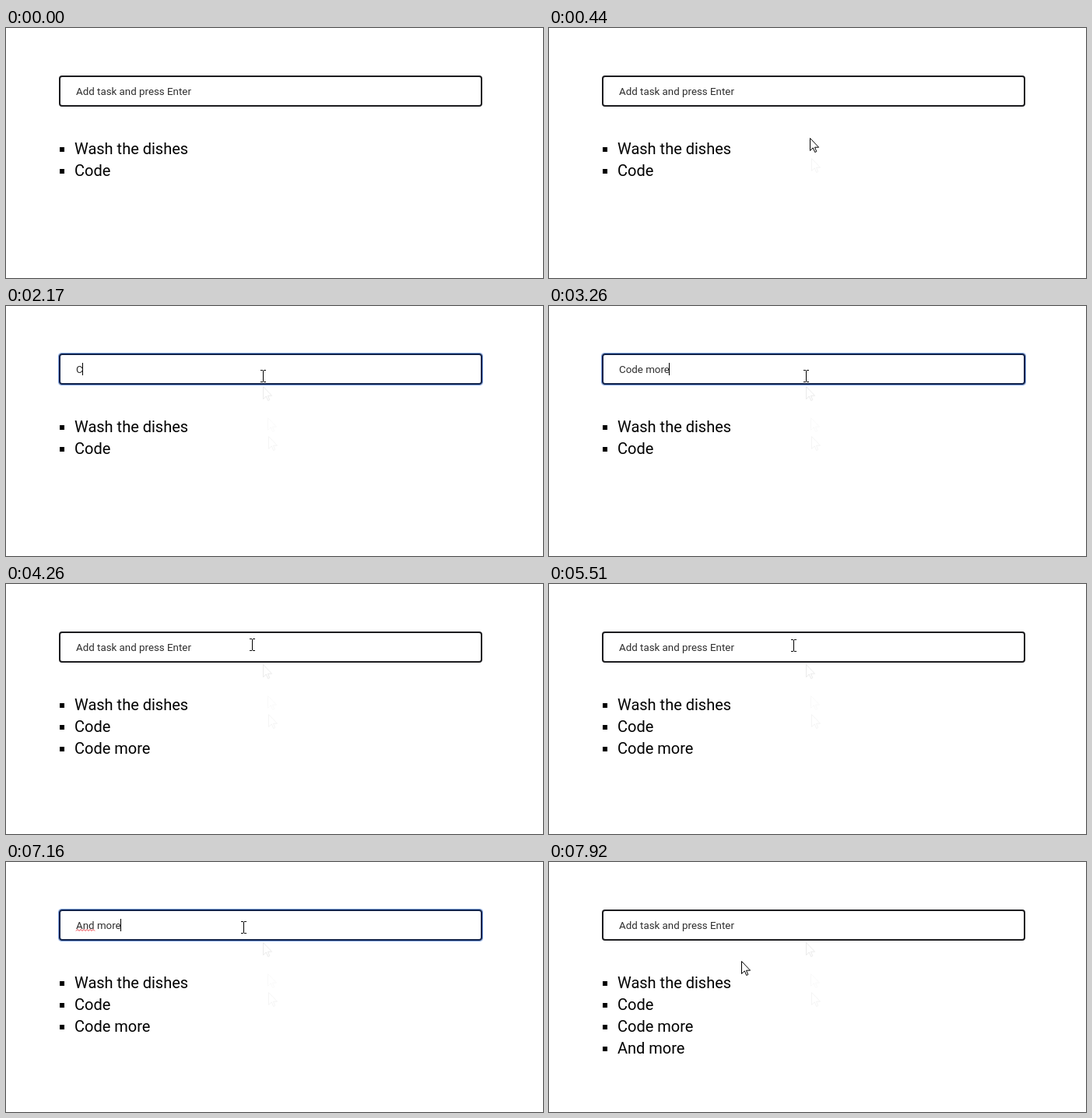
These frames come from a looping animation (690 by 321 pixels, 8 s). An HTML page:

```html
<!DOCTYPE html>
<html lang="en">
<head>
<meta charset="utf-8">
<title>Task list</title>
<style>
  html, body { margin: 0; width: 100%; height: 100%; overflow: hidden; background: #fff; }
  svg { display: block; width: 690px; height: 321px; }
  text { font-family: Roboto, Arial, sans-serif; white-space: pre; }
  .small { font-size: 13.333px; fill: #2e2e2e; }
  .item { font-size: 20px; fill: #000; }
  .off { visibility: hidden; }
  #box { fill: none; stroke: #1c1c1f; stroke-width: 2; }
  #box.focus { stroke: #10224a; }
  #ring { fill: none; stroke: #7fa3e2; }
  #squiggle { fill: none; stroke: #e8313a; }
</style>
</head>
<body>
<svg viewBox="0 0 690 321">
  <defs>
    <path id="arrow" d="M.5 .5V16.5L4.3 12.9 6.7 18.5 8.8 17.6 6.5 12.2H11.6Z" fill="#fff" stroke="#000"/>
    <path id="beam" d="M-3 -7.5H0M1 -7.5H4M.5 -7V7M-3 7.5H0M1 7.5H4" fill="none" stroke="#000"/>
  </defs>

  <rect id="ring" x="67.5" y="60.5" width="545" height="41" rx="3.5"/>
  <rect id="box" x="69" y="62" width="542" height="38" rx="3"/>
  <text id="hint" class="small" x="90" y="86">Add task and press Enter</text>
  <text id="value" class="small" x="90" y="86"></text>
  <path id="squiggle" d="M90 88.5l2 -2 2 2 2 -2 2 2 2 -2 2 2 2 -2 2 2 2 -2 2 2 2 -2 2 2"/>
  <rect id="caret" y="73" width="1" height="16"/>

  <g id="list"></g>
  <g id="trail"></g>
  <use id="cursor"/>
</svg>
<script>
const LOOP = 8000;
const $ = id => document.getElementById(id);
const SVG = 'http://www.w3.org/2000/svg';

function add(parent, tag, attrs, text = '') {
  const el = document.createElementNS(SVG, tag);
  for (const key in attrs) el.setAttribute(key, attrs[key]);
  el.textContent = text;
  parent.append(el);
  return el;
}

const show = (el, on) => el.classList.toggle('off', !on);
const latest = (steps, t) => steps.filter(s => s[0] <= t).pop();

// [time, shape, x, y]
const moves = [
  [140, 'arrow', 344, 198], [215, 'arrow', 341, 183], [290, 'arrow', 337, 167],
  [370, 'arrow', 336, 155], [440, 'arrow', 335, 141], [520, 'arrow', 332, 121],
  [600, 'arrow', 330, 103], [670, 'beam', 331, 94], [750, 'beam', 332, 90],
  [1010, 'beam', 330, 90], [4110, 'beam', 326, 86], [4180, 'beam', 320, 81],
  [4260, 'beam', 316, 78], [4890, 'beam', 316, 77], [5450, 'beam', 314, 79],
  [5520, 'beam', 312, 81], [5810, 'beam', 308, 83], [5920, 'beam', 305, 84],
  [7860, 'arrow', 270, 108], [7920, 'arrow', 247, 127]
];

const sessions = [
  { focus: 820, submit: 3560, text: 'Code more',
    keys: [2170, 2310, 2400, 2550, 2640, 2870, 3030, 3140, 3260],
    blinks: [1380, 1850] },
  { focus: 5600, submit: 7540, text: 'And more', checked: 6610,
    keys: [6310, 6460, 6530, 6610, 6760, 6910, 6990, 7160],
    blinks: [6130, 6310] }
];

// Faint marks left along the pointer's path: [time, x, y, opacity]
const trail = [[370, 337, 167, .04], [520, 336, 143, .018], [670, 330, 103, .08]]
  .map(([time, x, y, opacity]) => ({
    time, el: add($('trail'), 'use', { href: '#arrow', x, y, opacity })
  }));

const items = [['Wash the dishes', 0], ['Code', 0], ...sessions.map(s => [s.text, s.submit])]
  .map(([text, time], i) => {
    const el = add($('list'), 'g', { transform: `translate(0 ${28 * i})` });
    add(el, 'rect', { x: 69, y: 153, width: 6, height: 6 });
    add(el, 'text', { class: 'item', x: 88, y: 162 }, text);
    return { el, time };
  });

function drawInput(t) {
  const s = sessions.find(s => t >= s.focus && t < s.submit);
  const typed = s ? s.text.slice(0, s.keys.filter(k => k <= t).length) : '';
  const value = $('value');
  if (value.textContent !== typed) value.textContent = typed;

  $('box').classList.toggle('focus', !!s);
  show($('ring'), s);
  show($('hint'), !typed);
  show($('squiggle'), s && t >= s.checked);
  show($('caret'), s && !(t >= s.blinks[0] && t < s.blinks[1]));
  $('caret').setAttribute('x', 90 + (typed ? Math.floor(value.getComputedTextLength()) : 0));
}

function drawCursor(t) {
  const move = latest(moves, t);
  show($('cursor'), move);
  if (!move) return;
  const [, shape, x, y] = move;
  $('cursor').setAttribute('href', '#' + shape);
  $('cursor').setAttribute('transform', `translate(${x} ${y})`);
}

function frame(now) {
  const t = now % LOOP;
  drawInput(t);
  drawCursor(t);
  for (const { el, time } of [...items, ...trail]) show(el, t >= time);
  requestAnimationFrame(frame);
}

frame(0);
</script>
</body>
</html>
```
